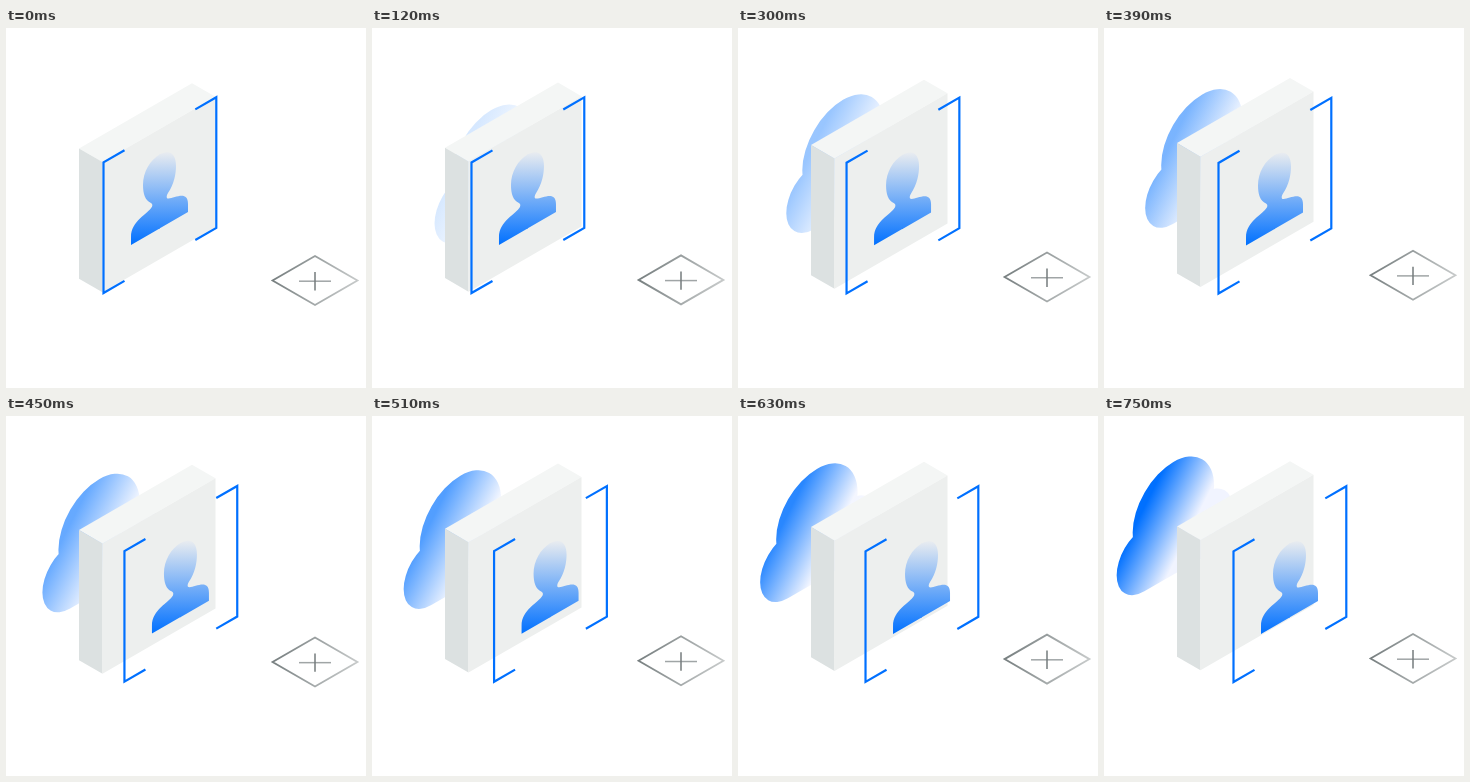
Animation of 360x360 px, one loop 1.5 s. Source, as an HTML page with a canvas:

```html
<!DOCTYPE html>
<html lang="en">
<head>
<meta charset="utf-8">
<title>Layers</title>
<style>
html, body { margin: 0; width: 100%; height: 100%; overflow: hidden; background: #fff; }
canvas { display: block; width: 360px; height: 360px; }
</style>
</head>
<body>
<canvas id="stage" width="360" height="360"></canvas>
<script>
const ctx = document.getElementById('stage').getContext('2d');
const LOOP = 1500, MOVE = 750, STEP = 30;
const COS = Math.cos(Math.PI / 6), SIN = 0.5, TAN = SIN / COS;
const BLUE = '#0070ff';

function gradient(x0, y0, x1, y1, from, to) {
  const g = ctx.createLinearGradient(x0, y0, x1, y1);
  g.addColorStop(0, from);
  g.addColorStop(1, to);
  return g;
}

// Runs draw with (a, b) as the x axis and (c, d) as the y axis
function plane(a, b, c, d, x, y, draw) {
  ctx.save();
  ctx.transform(a, b, c, d, x, y);
  draw();
  ctx.restore();
}

const at = (x, y, draw) => plane(1, 0, 0, 1, x, y, draw);
const wall = (x, y, draw) => plane(1, -TAN, 0, 1, x, y, draw);

function fill(style) {
  ctx.fillStyle = style;
  ctx.fill();
}

function stroke(style, width) {
  ctx.strokeStyle = style;
  ctx.lineWidth = width;
  ctx.stroke();
}

const cloudFill = gradient(28, 118, 74, 141, BLUE, '#f1f4ff');
const personFill = gradient(0, 125, 0, 217, '#e7ebf0', BLUE);
const rimFill = gradient(-42, -12, 42, 12, '#757d7e', '#c9cccc');

// One big circle over two smaller ones that rest on the base line
function cloud() {
  const r = 32, left = 47.3, right = 117.5, base = 200;
  ctx.beginPath();
  plane(COS, -SIN, 0, 1, 0, 0, () => {
    const circle = (x, y, r) => {
      ctx.moveTo(x + r, y);
      ctx.arc(x, y, r, 0, Math.PI * 2);
    };
    circle(left, base - r, r);
    circle(right, base - r, r);
    circle(80.8, 134.4, 47);
    ctx.rect(left, base - r, right - left, r);
  });
  fill(cloudFill);
}

function block() {
  const x = 96.5, y = 134, w = 113, h = 130.3, depth = 23.5;
  const side = (color, w, h) => () => {
    ctx.fillStyle = color;
    ctx.fillRect(0, 0, w, h);
  };
  plane(1, -TAN, 1, TAN, x - depth, y - depth * TAN, side('#f4f6f5', w, depth));
  plane(1, TAN, 0, 1, x - depth, y - depth * TAN, side('#dce1e1', depth, h));
  wall(x, y, side('#edefee', w, h));
}

// Symmetric on the wall, so each half is the mirror of the other
function person() {
  for (const s of [-1, 1]) {
    ctx.beginPath();
    wall(153.5, 200.5, () => {
      ctx.scale(s, 1);
      ctx.moveTo(-0.5, 0);
      ctx.lineTo(28.5, 0);
      ctx.lineTo(28.5, -8);
      ctx.bezierCurveTo(28.5, -24, 11.5, -21, 7.5, -26);
      ctx.quadraticCurveTo(6.5, -28.3, 8.5, -30.5);
      ctx.bezierCurveTo(14.5, -36, 16.5, -45, 16.5, -53);
      ctx.bezierCurveTo(16.5, -66, 9.5, -74, -0.5, -74);
    });
    fill(personFill);
  }
}

function brackets() {
  const w = 112.8, h = 130.6, arm = 21;
  for (const [x, dir] of [[0, 1], [w, -1]]) {
    ctx.beginPath();
    wall(97.5, 134.4, () => {
      ctx.moveTo(x + dir * arm, 0);
      ctx.lineTo(x, 0);
      ctx.lineTo(x, h);
      ctx.lineTo(x + dir * arm, h);
    });
    stroke(BLUE, 2.2);
  }
}

function line(x, y, color) {
  ctx.beginPath();
  ctx.moveTo(-x, -y);
  ctx.lineTo(x, y);
  stroke(color, 1.5);
}

function plusTile() {
  const half = 24.5;
  ctx.beginPath();
  plane(COS, SIN, -COS, SIN, 0, 0, () => ctx.rect(-half, -half, half * 2, half * 2));
  stroke(rimFill, 1.8);
  at(0, 0.7, () => {
    line(16, 0, '#a0a5a6');
    line(0, 9.2, '#747b7c');
  });
}

function draw(ms) {
  const p = Math.min(Math.floor((ms % LOOP) / STEP) * STEP / MOVE, 1);
  const e = (1 - Math.cos(Math.PI * p)) / 2;

  ctx.clearRect(0, 0, 360, 360);
  ctx.globalAlpha = p;
  at(59.4 * (1 - p) - 0.6, 43 * (1 - p) - 1, cloud);
  ctx.globalAlpha = 1;
  at(0, -10 * e, block);
  at(32 * e, e, () => { person(); brackets(); });
  at(309, 252.5 - 10 * e, plusTile);
}

let start;
function tick(now) {
  start ??= now;
  draw(now - start);
  requestAnimationFrame(tick);
}
draw(0);
requestAnimationFrame(tick);
</script>
</body>
</html>
```
